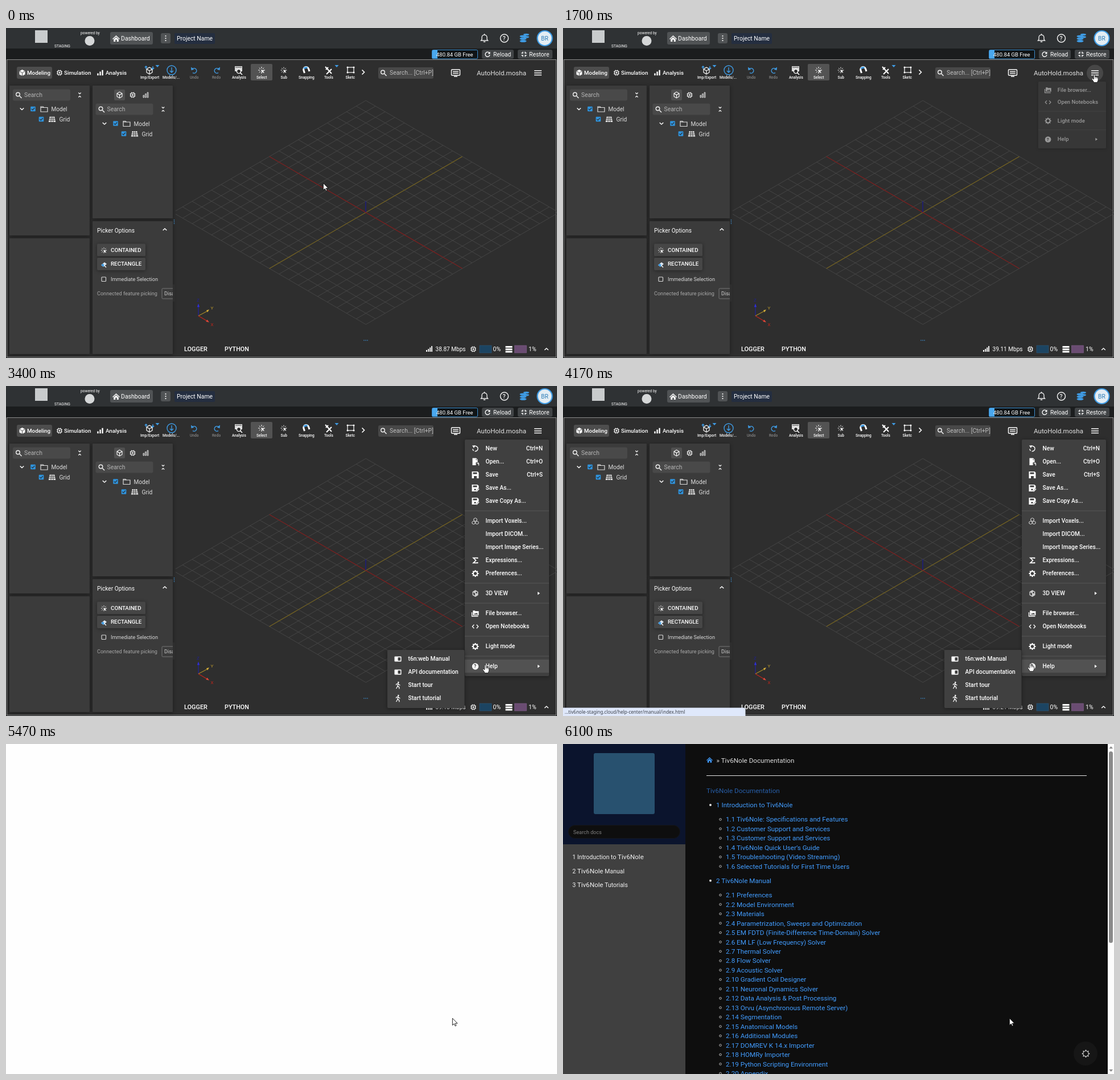
Write an HTML page that moves like this. It is 968 px wide and 579 px high and loops after 7300 ms.

```html
<!DOCTYPE html>
<html lang="en">
<head>
<meta charset="utf-8">
<title>Open the manual</title>
<style>
  html, body { margin: 0; width: 100%; height: 100%; overflow: hidden; background: #2e2e2e; }
  svg { display: block; position: absolute; left: 0; top: 0; }
  text { font-family: Roboto, Inter, sans-serif; white-space: pre; }
  .pop { filter: drop-shadow(0 1px 3px rgba(0, 0, 0, .4)); }
</style>
</head>
<body>
<svg id="stage" width="968" height="579" viewBox="0 0 968 579"></svg>
<script>
const LOOP = 7300;
const BLUE = '#3f9be3';
const APP = 'Tiv6Nole';

// ---------- drawing helpers ----------
// Text is placed by its left edge and the middle of its capitals; baselines sit on whole pixels.
const text = (x, y, s, size = 10.3, fill = '#fff', extra = '') =>
  `<text x="${x}" y="${Math.round(y + size * .355)}" font-size="${size}" fill="${fill}" ${extra}>${s}</text>`;
const bold = 'font-weight="500"';
const rect = (x, y, w, h, fill, r = 0, extra = '') =>
  `<rect x="${x}" y="${y}" width="${w}" height="${h}" rx="${r}" fill="${fill}" ${extra}/>`;
const disc = (x, y, r, fill, extra = '') => `<circle cx="${x}" cy="${y}" r="${r}" fill="${fill}" ${extra}/>`;
const line = (d, stroke = '#fff', w = 1.2, extra = '') =>
  `<path d="${d}" fill="none" stroke="${stroke}" stroke-width="${w}" ${extra}/>`;
const fill = (d, color = '#fff') => `<path d="${d}" fill="${color}" fill-rule="evenodd"/>`;
const at = (x, y, body, k = 1) => `<g transform="translate(${x} ${y}) scale(${k})">${body}</g>`;
const range = n => [...Array(n).keys()];
const rays = (n, r1, r2) => range(n).map(i => {
  const a = i * 2 * Math.PI / n, c = Math.cos(a), s = Math.sin(a);
  return `M${(c * r1).toFixed(2)} ${(s * r1).toFixed(2)}L${(c * r2).toFixed(2)} ${(s * r2).toFixed(2)}`;
}).join('');

const cube = 'M0-6L5-3V3L0 6L-5 3V-3ZM-5-3L0 0L5-3M0 0V6';
const icon = {
  search: line('M2 2L5.5 5.5', '#eee', 1.6) + disc(-1, -1, 3.3, 'none', 'stroke="#eee" stroke-width="1.4"'),
  cube: line(cube),
  chip: rect(-4, -4, 8, 8, 'none', 2, 'stroke="#fff" stroke-width="1.5"') + rect(-1.5, -1.5, 3, 3, '#fff') +
    line('M-2-6V-4M2-6V-4M-2 4V6M2 4V6M-6-2H-4M-6 2H-4M4-2H6M4 2H6', '#fff', 1),
  bars: fill('M-5.5 1H-3V5H-5.5ZM-1.2-2H1.3V5H-1.2ZM3-5H5.5V5H3Z'),
  barsThin: line('M-4.5 .5H-2.8V4.5H-4.5ZM-.9-2H.8V4.5H-.9ZM2.7-4.5H4.4V4.5H2.7Z', '#ddd', 1),
  home: fill('M-6.5 .5L0-5.5L6.5 .5L5.6 1.5L0-3.5L-5.6 1.5ZM-4.3 1.5L0-2.3L4.3 1.5V5.5H1.3V2H-1.3V5.5H-4.3Z'),
  folder: line('M-6-4H-2L-.5-2.5H6V5H-6ZM-6-2.5H0', '#ddd', 1.2),
  grid: fill('M-4.3-4.5H4.3L6.3 5H-6.3Z', '#e0e0e0') +
    line('M-5-1.3H5M-5.6 1.8H5.6M-1.4-4.5L-2 5M1.4-4.5L2 5', '#3b3b3b', .9),
  check: rect(-4.3, -4.3, 8.6, 8.6, '#2f93dc', 1) + line('M-2.6 0L-.7 1.9L2.8-2', '#2b3640', 1.3),
  down: line('M-3.3-1.6L0 1.6L3.3-1.6', '#fff', 1.4),
  up: line('M-3.3 1.6L0-1.6L3.3 1.6', '#fff', 1.4),
  fold: line('M-2.2-4L0-1.8L2.2-4M-2.2 4L0 1.8L2.2 4', '#fff', 1.2),
  turn: line('M4-2A4.5 4.5 0 1 0 4.5 1.2', '#fff', 1.5) + fill('M5-5V-.5H.5Z'),
  undo: line('M-3 4.5A4.3 4.3 0 1 0-3.6-2', BLUE, 1.5) + fill('M-6-5.5L-5.5 .2L-.6-1.5Z', BLUE),
  click: line(rays(8, 3, 6), '#fff', 1) + fill('M-1-1L5 1L2.5 2.2L4.6 4.4L3.8 5.2L1.8 3.1L1 5Z'),
  folderPics: line('M-6-2V5H5', '#fff', 1.3) + fill('M-4.2-5H-1L0-4H6V3.2H-4.2ZM-2.5 1.8H4.7L2.4-1.2L.8 .6L-.4-.6Z'),
  code: line('M-2.2-3.2L-5.2 0L-2.2 3.2M2.2-3.2L5.2 0L2.2 3.2', '#fff', 1.3),
  gear: disc(0, 0, 3.7, 'none', 'stroke="#fff" stroke-width="2"') + line(rays(8, 4, 6), '#fff', 2),
  help: disc(0, 0, 5.7, '#fff') + text(-2.4, .2, '?', 8.5, '#404040', 'font-weight="700"'),
  fresh: line('M-3-3.6A4.6 4.6 0 1 1-4.6 .5', '#fff', 1.5, 'stroke-dasharray="18 2"') + fill('M-5.5-5.5L-.3-5.8L-2.5-1Z'),
  page: fill('M-5-6.5H1.5L4-4V1H1V6H-5ZM1-5.5V-3.3H3.2Z') + line('M2.5 3H6M4.5 1.5L6 3V6.5', '#fff', 1.2),
  save: fill('M-6-6H4L6-4V6H-6ZM-4-4.5H3V-1.5H-4ZM-2.5 2H2.5V6H-2.5Z'),
  saveAs: fill('M-6-6H3.5L6-4V0L1 6H-6ZM-4-4.5H3V-1.5H-4ZM-2 1.5H1V4H-2Z') + line('M2 6.3L6.6 1.6', '#fff', 1.5),
  voxels: line('M0-5.5L2.7-4V-1L0 .5L-2.7-1V-4ZM-3 0L-.4 1.5V4.2L-3 5.6L-5.6 4.2V1.5ZM3 0L5.6 1.5V4.2L3 5.6L.4 4.2V1.5Z', '#ddd', 1),
  sum: line('M4-3V-4.4H-3.5L1 0L-3.5 4.4H4V3', '#fff', 1.7),
  view: fill('M0-6L5-3V3L0 6L-5 3V-3ZM-3.6-2L-.6-.3V3.8L-3.6 2Z', '#ccc') + disc(2, -1.5, 1.4, '#404040'),
  book: rect(-6, -4.5, 12, 9, '#fff', 1) + rect(0, -2.8, 4.6, 5.6, '#404040'),
  walk: disc(.8, -5, 1.3, '#fff') + line('M.3-3L-.5 1.2L2 3.2L2.5 6.3M-.5 1.2L-1.5 3.5L-3 6M-3.2-.2L-2.6-2L.5-3L2 -.8L4 0', '#fff', 1.3)
};
const put = (name, x, y, k = 1) => at(x, y, icon[name], k);

// ---------- application window ----------
function header() {
  return rect(0, 0, 968, 36, '#2f3234') + rect(0, 36, 968, 20, '#1b1d1e') +
    rect(51, 4, 22, 22, '#c9cccd') +
    text(85, 32, 'STAGING', 6.7) + text(131, 8.8, 'powered by', 6.6) + disc(147, 22.5, 8.5, '#d5d7d8') +
    rect(183, 7, 75, 22, '#505355', 3) + put('home', 193.5, 18.5) + text(202, 18.5, 'Dashboard', 10.5) +
    rect(272, 9, 17, 18, '#505355', 3) + [14, 18, 22].map(y => disc(280.5, y, 1.1, '#fff')).join('') +
    rect(296, 9, 71, 19, '#242e40', 2) + text(300, 18.5, 'Project Name', 10.4) +
    line('M834.5 22H846.5L845 20V16.5A4.5 4.5 0 0 0 836 16.5V20ZM838.8 24.3H842.2M840.5 10V12', '#e8e8e8', 1.4) +
    disc(875.5, 18, 7, 'none', 'stroke="#eee" stroke-width="1.5"') + text(872.6, 18.2, '?', 10.5, '#eee', bold) +
    [0, 4.2, 8.4].map(d => `<ellipse cx="908.5" cy="${14.5 + d}" rx="6" ry="2.1" fill="${BLUE}"/>`).join('') +
    [0, 4.2].map(d => `<ellipse cx="914" cy="${11.5 + d}" rx="5" ry="1.8" fill="${BLUE}"/>`).join('') +
    disc(946.5, 18, 13, '#e3edf4', `stroke="${BLUE}" stroke-width="2.2"`) + text(940, 18.2, 'BR', 10.3, '#2d7db8') +
    rect(748.5, 38.5, 80, 15.5, '#101416', 2, 'stroke="#3b8fd0"') + rect(749, 39, 9, 14.5, '#4aa8ee') +
    text(756, 46.5, '480.84 GB Free', 9.5) +
    rect(836, 38, 56, 16, '#414446', 3) + put('turn', 846, 46, .9) + text(856, 46, 'Reload', 10.2) +
    rect(899, 38, 61, 16, '#414446', 3) + text(919, 46, 'Restore', 10.4) +
    line('M908 41.5V44H905.5M912 41.5V44H914.5M908 50.5V48H905.5M912 50.5V48H914.5', '#fff', 1.3);
}

function toolbar() {
  const labels = [['Imp/Export', 236], ['Models/...', 275], ['Undo', 323, '#858585'], ['Redo', 362, '#858585'],
    ['Analysis', 397], ['Select', 440], ['Sub', 482.5], ['Snapping', 514], ['Tools', 559], ['Sketc', 596.5]];
  return rect(19, 68, 62, 21, '#4d4d4d', 3) +
    at(28.5, 78.5, fill('M0-5.5L5-2.8V3L0 5.5L-5 3V-2.8Z') + line('M-5-2.8L0 0L5-2.8M0 0V5.5', '#4d4d4d', 1)) +
    text(37, 78.5, 'Modeling', 9.8, '#fff', bold) +
    put('chip', 94, 78.5, .85) + text(102, 78.5, 'Simulation', 9.9, '#fff', bold) +
    put('bars', 165.5, 78.5, .95) + text(175, 78.5, 'Analysis', 9.8, '#fff', bold) +
    rect(430, 63, 38, 29, '#535353', 2) +
    labels.map(([s, x, c]) => text(x, 86.5, s, 6.6, c || '#fff', bold)).join('') +
    put('cube', 252, 75) + line('M246 72V67M243.8 69.2L246 67L248.2 69.2M258 67V72M255.8 70L258 72.2L260.2 70', BLUE, 1.4) +
    at(291, 74, disc(0, 0, 8, 'none', `stroke="${BLUE}" stroke-width="1.4"`) + line('M0-5V4M-3 1L0 4L3 1', BLUE, 1.4)) +
    put('undo', 331, 74) + `<g transform="translate(370 74) scale(-1 1)">${icon.undo}</g>` +
    rect(402, 67, 13, 9, '#ddd') + line('M403 69H414', '#444', 1) + disc(409, 76, 3.6, '#2e2e2e', 'stroke="#fff" stroke-width="1.4"') + line('M411.5 78.5L415 82', '#fff', 1.6) +
    put('click', 449, 74) + put('click', 488, 74, .9) +
    at(527.5, 74, line('M-3 5L-4.5 .5A4.5 4.5 0 0 1 4-2.5L5.5 2', '#fff', 3) + line('M-4-2.5A4.5 4.5 0 0 1 2-4', BLUE, 3)) +
    line('M561 68L572 80M572 72L563 81M566 69L562 73', '#fff', 2) +
    rect(600, 69, 11, 9, 'none', 0, 'stroke="#fff" stroke-width="1.2"') +
    [[600, 69], [611, 69], [600, 78], [611, 78]].map(p => disc(...p, 1.5, '#fff')).join('') +
    [266, 581].map(x => fill(`M${x - 3.5} 65H${x + 3.5}L${x} 69Z`, BLUE)).join('') +
    line('M625.5 73.5L629.5 77.5L625.5 81.5', '#fff', 1.6) +
    rect(654, 69, 97, 20, '#484848', 3) + put('search', 663, 78.5) + text(674, 78.8, 'Search... [Ctrl+P]', 10.4, '#bcbcbc') +
    rect(782.5, 73, 15, 10, 'none', 1, 'stroke="#fff" stroke-width="1.4"') + line('M785 76.5H795M785 79.5H795M787 85H793', '#fff', 1.3) +
    text(827, 78.5, 'AutoHold.mosha', 11.6, '#e2e2e2') +
    disc(934.5, 79, 14.5, '#474747', 'id="halo"') +
    line('M928 75H941M928 78.7H941M928 82.4H941', '#fff', 1.5);
}

function tree(x, y) {
  return at(x, y, put('down', 0, 0) + put('check', 19.5, 0) + put('folder', 39, 0) + text(51.5, 0, 'Model', 10.1, '#ddd') +
    put('check', 34, 18) + put('grid', 53, 18) + text(65.5, 18, 'Grid', 10.3, '#ddd'));
}

function panels() {
  const box = (x, y, h) => rect(x, y, 141, h, '#3b3b3b', 1, 'class="pop"');
  const field = (x, y) => rect(x, y, 101, 20, '#494949', 3) + put('search', x + 10, y + 10) + text(x + 20, y + 10, 'Search', 10.4, '#b4b4b4');
  return box(6, 101, 263) + box(6, 369, 203) + box(152, 101, 233) + box(152, 339, 233) +
    field(12, 107.5) + put('fold', 129.5, 117.5) + tree(28, 142) +
    rect(190, 108, 19, 19, '#505050', 2) + put('cube', 199.5, 117.5, .9) + put('chip', 222.5, 117.5, .85) + put('barsThin', 245.5, 117.5) +
    field(157.5, 132.5) + put('fold', 276, 142.5) + tree(173, 167.5) +
    text(160, 355, 'Picker Options', 10.2) + put('up', 279, 353.5) +
    [[378.5, 'CONTAINED'], [403, 'RECTANGLE']].map(([y, s]) =>
      rect(160, y, 85, 22, '#464646', 2, 'class="pop"') + text(184, y + 11, s, 9.8, '#fff', bold)).join('') +
    put('click', 172, 390, .85) +
    at(172, 415, fill('M-5 1L1-4L5-1L-1 4Z', '#dfe9f2') + fill('M-5 1L-2-1.5L2 1.5L-1 4Z', BLUE) + line('M0 1L4 5', '#fff', 1.2)) +
    rect(168, 437, 7.5, 7.5, 'none', 1, 'stroke="#ddd" stroke-width="1.1"') + text(184, 440.5, 'Immediate Selection', 9.1, '#d8d8d8') +
    text(160, 466, 'Connected feature picking', 9.1, '#a8a8a8') +
    line('M293 457H275.5Q274 457 274 458.5V473.5Q274 475 275.5 475H293', '#777', 1) + text(278, 466, 'Disa', 9.1, '#ccc') +
    rect(293, 450, 4, 30, '#2e2e2e') +
    [337, 340, 343].map(y => disc(295.5, y, .8, BLUE)).join('');
}

function scene() {
  const cx = 632.2, cy = 323.7, dx = 169.5, dy = 98.2;
  const p = (a, b) => `${(cx + (a + b) * dx).toFixed(1)} ${(cy + (a - b) * dy).toFixed(1)}`;
  let d = '';
  for (let i = -10; i <= 10; i++) d += `M${p(i / 10, -1)}L${p(i / 10, 1)}M${p(-1, i / 10)}L${p(1, i / 10)}`;
  return '<svg x="298" y="101" width="669" height="450" viewBox="298 101 669 450">' +
    line(d, '#4b4b4b', .8) + line(`M${p(0, -1)}L${p(0, 1)}`, '#74621f', 1.2) +
    line(`M${p(-1, 0)}L${p(1, 0)}`, '#7c1c1c', 1.2) + line('M632 323V304', '#1c1c86', 1.4) + '</svg>' +
    line('M338 505V486', '#2222a8', 1.1) + fill('M335.8 489.5L338 483.5L340.2 489.5Z', '#2f2fd8') +
    line('M338 505L354 496.5', '#a88a28', 1.2) + fill('M352 495.2L357 494L354 498.7Z', '#d8b03a') +
    line('M338 505L354 514.5', '#c0261c', 1.2) + fill('M351.2 514.9L357 516.6L353.6 511.8Z', '#e2483a') +
    text(335, 477, 'Z', 8, '#20208f') + text(359.5, 491.5, 'Y', 8, '#c09c2c') + text(359.5, 520.5, 'X', 8, '#c0261c');
}

function footer() {
  return [629, 632, 635].map(x => disc(x, 548, .8, BLUE)).join('') +
    text(313, 563.3, 'LOGGER', 10.9, '#fff', bold) + text(384, 563.3, 'PYTHON', 10.8, '#fff', bold) +
    fill('M738 565H740V568H738ZM741.3 563H743.2V568H741.3ZM744.3 560.5H746.2V568H744.3ZM747.2 558H749V568H747.2Z') +
    text(754.5, 563.3, '', 10.05, '#fff', 'id="rate"') +
    put('chip', 821, 563.5, .85) + rect(832, 557, 21, 13, '#1c4462', 0, 'stroke="#2c587a" stroke-width=".6"') + text(855.5, 563.5, '0%', 10.5) +
    fill('M877.5 558H889.5V561H877.5ZM877.5 562.2H889.5V565.2H877.5ZM877.5 566.4H889.5V569.4H877.5Z') +
    rect(893.5, 557, 21, 13, '#6a4c72', 0, 'stroke="#80608a" stroke-width=".6"') + text(918, 563.5, '1%', 10.5) + put('up', 949.5, 563.5);
}

// ---------- menus ----------
const ROW = 23, GAP = 12;
const tail = [['folderPics', 'File browser...'], ['code', 'Open Notebooks'], 0, ['gear', 'Light mode'], 0, ['help', 'Help', '▸']];
const mainItems = [['fresh', 'New', 'Ctrl+N'], ['page', 'Open...', 'Ctrl+O'], ['save', 'Save', 'Ctrl+S'],
  ['saveAs', 'Save As...'], ['saveAs', 'Save Copy As...'], 0,
  ['voxels', 'Import Voxels...'], ['', 'Import DICOM...'], ['', 'Import Image Series...'], ['sum', 'Expressions...'],
  ['gear', 'Preferences...'], 0, ['view', '3D VIEW', '▸'], 0, ...tail];
const helpItems = [['book', 't6n:web Manual'], ['book', 'API documentation'], ['walk', 'Start tour'], ['walk', 'Start tutorial']];

function menu(id, items, x, y, w) {
  const rows = [];
  let body = '', top = y + 4;
  for (const item of items) {
    if (!item) {
      body += rect(x, top + GAP / 2 - .5, w, 1, '#565656');
      top += GAP;
      continue;
    }
    const [name, label, end] = item, mid = top + ROW / 2;
    rows.push(top);
    if (name) body += put(name, x + 18.5, mid + .5);
    body += text(x + 36.5, mid, label, 10.25, '#fff', bold);
    if (end === '▸') body += fill(`M${x + w - 20} ${mid - 2.5}L${x + w - 16} ${mid + .3}L${x + w - 20} ${mid + 3}Z`);
    else if (end) body += text(x + w - 11, mid, end, 10.2, '#fff', 'text-anchor="end" ' + bold);
    top += ROW;
  }
  const svg = `<g id="${id}" class="pop">` + rect(x, y, w, top + 6 - y, '#404040', 2) +
    rect(x, 0, w, ROW, '#525252', 0, `id="${id}Row"`) + body + '</g>';
  return { svg, rows };
}
const brief = menu('brief', tail, 826, 94, 128);
const main = menu('main', mainItems, 806, 94, 148);
const sub = menu('sub', helpItems, 670, 463, 135.5);

// ---------- documentation page ----------
function docs() {
  const link = '#429dff';
  const intro = [`${APP}: Specifications and Features`, 'Customer Support and Services', 'Customer Support and Services',
    `${APP} Quick User’s Guide`, 'Troubleshooting (Video Streaming)', 'Selected Tutorials for First Time Users'];
  const manual = ['Preferences', 'Model Environment', 'Materials', 'Parametrization, Sweeps and Optimization',
    'EM FDTD (Finite-Difference Time-Domain) Solver', 'EM LF (Low Frequency) Solver', 'Thermal Solver', 'Flow Solver',
    'Acoustic Solver', 'Gradient Coil Designer', 'Neuronal Dynamics Solver', 'Data Analysis &amp; Post Processing',
    'Orvu (Asynchronous Remote Server)', 'Segmentation', 'Anatomical Models', 'Additional Modules',
    'DOMREV K 14.x Importer', 'HOMRy Importer', 'Python Scripting Environment', 'Appendix'];
  const section = (n, y, title, list) => disc(259, y, 2, '#ddd') + text(269, y, `${n} ${title}`, 11.7, link) +
    list.map((s, i) => {
      const ly = y + 25.3 + i * 16.47;
      return disc(276.5, ly, 1.8, 'none', 'stroke="#ccc" stroke-width=".9"') + text(286, ly, `${n}.${i + 1} ${s}`, 11.7, link);
    }).join('');
  const big = `<tspan font-size="11.6">${APP}</tspan>`;
  return rect(0, 0, 968, 579, '#0e0e0e') + rect(0, 0, 215, 176, '#0b142d') + rect(0, 176, 215, 403, '#404040') +
    rect(54, 16, 107, 107, '#28516f', 3) +
    rect(9.5, 142.5, 196, 23, '#0e0e0e', 11.5, 'stroke="#14161c"') + text(18, 154.5, 'Search docs', 9.1, '#808080') +
    [[198, `1 Introduction to ${big}`], [223, `2 ${big} Manual`], [247.5, `3 ${big} Tutorials`]]
      .map(([y, s]) => text(16.5, y, s, 10.5, '#f0f0f0')).join('') +
    at(257.5, 28, icon.home.replace('#fff', link), .85) + text(269.5, 28.5, `» ${APP} Documentation`, 11.7, '#ddd') +
    rect(252, 55, 668, 1, '#e4e4e4') + text(252, 81.5, `${APP} Documentation`, 11.7, '#275ea8') +
    section(1, 107, `Introduction to ${APP}`, intro) + section(2, 239.7, `${APP} Manual`, manual) +
    disc(918, 543, 21, '#161616') +
    at(918.5, 543.3, disc(0, 0, 4.8, 'none', 'stroke="#d8d8d8" stroke-width="1.1"') + line(rays(8, 5, 6.8), '#d8d8d8', 1.7)) +
    rect(957, 0, 11, 579, '#fcfcfc') + rect(959, 13, 7, 336, '#8b8b8b', 3.5) +
    fill('M959.5 8L962.7 4L966 8ZM959.5 571L962.7 575L966 571Z', '#8b8b8b');
}

const arrow = '<path d="M0 0V12.2L2.9 9.6L4.7 13.7L6.6 12.9L4.8 8.9H8.7Z" fill="#fff" stroke="#111" stroke-width=".9"/>';
const hand = '<path d="M-1.2 .8Q0-.7 1.2 .8V5Q2.4 4.2 3.2 5.2Q4.4 4.6 5 5.6Q6.6 5.4 6.6 7V10Q6.6 12 5.4 13V14.5H-1.4V13L-4.6 8.6Q-4.8 7-3 7.4L-1.2 9Z" fill="#fff" stroke="#111" stroke-width=".8"/>' +
  line('M1.2 5V8M3.2 5.4V8M5 5.8V8', '#555', .6);

document.getElementById('stage').innerHTML =
  '<g id="app">' + rect(0, 0, 968, 579, '#1b1d1e') + header() + rect(1.5, 55.5, 965, 522, '#2e2e2e', 0, 'stroke="#8b8b8b"') +
  toolbar() + panels() + scene() + footer() +
  '<g id="url">' + fill('M0 564.5H317Q320.5 564.5 320.5 568V579H0Z', '#dfe8fb') +
  `<text x="3" y="574.8" font-size="8.05" fill="#3a3f48" style="font-family:'Noto Sans','Open Sans',sans-serif">...tiv6nole-staging.cloud/help-center/manual/index.html</text></g>` +
  brief.svg + main.svg + sub.svg + disc(785, 481, 18, '#fff', 'id="ripple" opacity=".14"') + '</g>' +
  rect(0, 0, 968, 579, '#fefefe', 0, 'id="blank"') + `<g id="docs">${docs()}</g>` +
  `<g id="pointer"><g id="arrow">${arrow}</g><g id="hand">${hand}</g></g>`;

// ---------- motion ----------
const el = {};
document.querySelectorAll('[id]').forEach(n => el[n.id] = n);
const show = (n, on) => n.setAttribute('display', on ? 'inline' : 'none');
const clamp = v => Math.max(0, Math.min(1, v));
const ease = v => .5 - .5 * Math.cos(Math.PI * clamp(v));

// [start, end, x, y]: eased moves to each resting place
const moves = [[0, 1240, 933.5, 81], [2082, 2779, 842, 489], [3870, 4600, 784.4, 481.2]];
const rates = [[0, '38.87'], [420, '38.96'], [1100, '39.04'], [1640, '39.11'], [2400, '39.15'], [2960, '39.18'], [4020, '39.21'], [4900, '39.23']];

function pointer(t) {
  let x = 557.4, y = 272.2;
  for (const [a, b, tx, ty] of moves) {
    const k = ease((t - a) / (b - a));
    x += (tx - x) * k;
    y += (ty - y) * k;
  }
  return [x, y];
}

function hover(m, id, y, on) {
  const top = on ? m.rows.find(r => y >= r && y < r + ROW) : undefined;
  show(el[id + 'Row'], top !== undefined);
  if (top !== undefined) el[id + 'Row'].setAttribute('y', top);
}

function draw(t) {
  const [x, y] = pointer(t), [hx, hy] = pointer(t - 50);
  const onBurger = Math.hypot(x - 934.5, y - 79) < 14.5;
  const full = t >= 2000, subOpen = t >= 3150, inSub = subOpen && hx < 806;

  show(el.app, t < 5470);
  show(el.blank, t >= 5470 && t < 5900);
  show(el.docs, t >= 5900);

  show(el.halo, onBurger);
  show(el.brief, t >= 1600 && !full);
  const p = clamp((t - 1600) / 200), s = .86 + .14 * p;
  el.brief.setAttribute('opacity', p);
  el.brief.setAttribute('transform', `translate(954 94) scale(${s}) translate(-954 -94)`);
  show(el.main, full);
  show(el.sub, subOpen);
  hover(brief, 'brief', hy, false);
  hover(main, 'main', hy, full && !inSub);
  hover(sub, 'sub', hy, inSub);

  show(el.url, t >= 3480 && t < 5200);
  show(el.ripple, t >= 5370);
  el.ripple.setAttribute('r', 18 * clamp((t - 5340) / 60));
  el.rate.textContent = rates.filter(r => r[0] <= t).pop()[1] + ' Mbps';

  const link = t < 5370 && (onBurger || (full && y > 94 && x > 670));
  show(el.hand, link);
  show(el.arrow, !link);
  el.pointer.setAttribute('transform', `translate(${x.toFixed(2)} ${y.toFixed(2)})`);
}

const begin = performance.now();
function tick() {
  draw((performance.now() - begin) % LOOP);
  requestAnimationFrame(tick);
}
tick();
</script>
</body>
</html>
```
